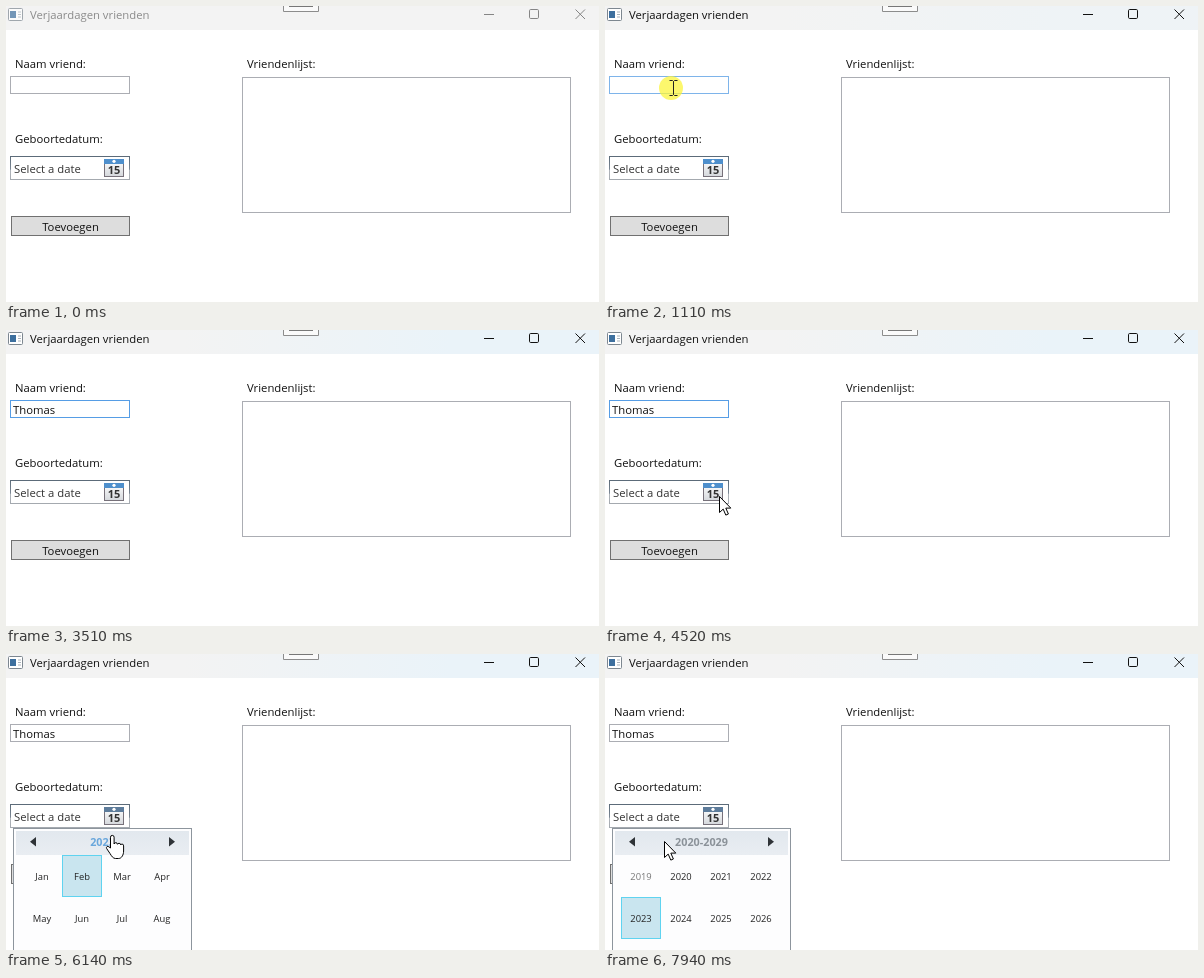
Write an HTML page that moves like this. It is 593 px wide and 296 px high and loops after 8 s.

```html
<!DOCTYPE html>
<html lang="nl">
<head>
<meta charset="utf-8">
<title>Verjaardagen vrienden</title>
<style>
  html, body { margin: 0; width: 100%; height: 100%; overflow: hidden; background: #fff; }
  svg { display: block; width: 593px; height: 296px; }
  text { font: 11.3px "Open Sans", "Noto Sans", sans-serif; fill: #111; white-space: pre; }
  .mid { text-anchor: middle; }
  .small { font-size: 9.4px; fill: #222; }
  .bold { font-size: 10.2px; font-weight: 700; fill: #333; }
  .muted { fill: #777; }
  .box { fill: #fff; stroke: #abadb3; }
  .pick { fill: #c9e5ef; stroke: #5fd3f0; }
  .pointer { fill: #fff; stroke: #000; stroke-linejoin: round; }
</style>
</head>
<body>
<svg viewBox="0 0 593 296">
  <defs>
    <linearGradient id="active"><stop offset=".3" stop-color="#f3f3f3"/><stop offset=".75" stop-color="#eaf3f9"/></linearGradient>
    <linearGradient id="edge" x2="0" y2="1"><stop stop-color="#5c6b79"/><stop offset=".55" stop-color="#7b8794"/><stop offset=".6" stop-color="#b0b5bb"/><stop offset="1" stop-color="#a4a9af"/></linearGradient>
    <linearGradient id="band" x2="0" y2="1"><stop stop-color="#e2e8ee"/><stop offset="1" stop-color="#e9edf2"/></linearGradient>
    <linearGradient id="paper" x2="0" y2="1"><stop stop-color="#fff"/><stop offset="1" stop-color="#d5d8dc"/></linearGradient>
  </defs>

  <rect width="593" height="24" fill="#f3f3f3"/>
  <rect id="activeBar" width="593" height="24" fill="url(#active)"/>
  <g id="windowIcon">
    <rect x="2.5" y="2.5" width="14" height="12" rx="1" fill="#fff" stroke="#7d8790"/>
    <rect x="4" y="5" width="6" height="7" fill="#3d6f9e"/>
    <path d="M12 6h3M12 8.5h3M12 11h3" stroke="#aab2ba"/>
  </g>
  <path d="M277.5 0V5.5H312.5V0" fill="#fafafa" stroke="#8c8c8c"/>
  <path d="M283 .5h24" stroke="#777"/>
  <text id="caption" x="24" y="13">Verjaardagen vrienden</text>
  <g id="controls" fill="none">
    <path d="M478 8.5h10M569.5 3.5l9.5 9.5M579 3.5l-9.5 9.5"/>
    <rect x="523.5" y="3.5" width="9" height="9" rx="1.2"/>
  </g>

  <text x="9" y="62">Naam vriend:</text>
  <text x="241" y="62">Vriendenlijst:</text>
  <text x="9" y="137">Geboortedatum:</text>
  <rect class="box" x="236.5" y="71.5" width="328" height="135"/>
  <rect id="nameBox" class="box" x="4.5" y="70.5" width="119" height="17"/>
  <text id="name" x="7" y="84"></text>
  <path id="caret" d="M.5 72v14" stroke="#000"/>

  <rect x="4.5" y="150.5" width="119" height="23" fill="#fff" stroke="url(#edge)"/>
  <text x="8" y="167" style="fill:#333">Select a date</text>
  <rect x="98.5" y="153.5" width="19" height="17" fill="url(#paper)" stroke="#77717a"/>
  <rect id="iconTop" x="98" y="153" width="20" height="5"/>
  <circle cx="108" cy="155.3" r="1.6" fill="#fff"/>
  <text class="bold mid" x="108" y="168.3" style="font-size:11px">15</text>

  <rect x="5.5" y="210.5" width="118" height="19" fill="#ddd" stroke="#707070"/>
  <text class="mid" x="64.5" y="225">Toevoegen</text>

  <g id="popup">
    <rect x="7.5" y="174.5" width="178" height="130" fill="#fdfdfe" stroke="#8d959d"/>
    <rect x="10" y="177" width="173" height="24" fill="url(#band)"/>
    <path d="M30 183v9.6l-6-4.8zM163 183v9.6l6-4.8z" fill="#2f3337"/>
    <text id="heading" class="bold mid" x="96.5" y="192"></text>
    <g id="days"><rect x="65.5" y="226.5" width="20" height="15" rx="1" fill="#a5a9ac" stroke="#8fbbdc"/></g>
    <g id="months"><rect class="pick" x="56.5" y="201.5" width="39" height="41"/></g>
    <g id="years"><rect class="pick" x="16.5" y="243.5" width="39" height="41"/></g>
  </g>

  <circle id="click" r="12" fill="#fbf43c" opacity=".75"/>
  <g id="cursor">
    <path id="arrow" class="pointer" d="M.5.5V16.5l3.7-3.4 2.6 6 2.6-1.1-2.6-5.9h5z"/>
    <path id="beam" fill="none" stroke="#222" d="M-3.5-7.5h3l1 1 1-1h3M.5-6.5v13M-3.5 7.5h3l1-1 1 1h3"/>
    <path id="hand" class="pointer" d="M-1.5 13V2.2a1.8 1.8 0 0 1 3.6 0V9q.3-1.3 1.7-1.3 1.6 0 1.7 1.6.3-1 1.6-1 1.5 0 1.6 1.6.3-.8 1.4-.8 1.5 0 1.5 1.8V16c0 4-2 7.5-5 7.5H3.5C1 23.5-.5 21-2 18.5L-5.3 13.6c-1-1.6.9-2.9 2.2-1.8z"/>
  </g>
</svg>
<script>
const LOOP = 8000, STEP = 70;
const $ = id => document.getElementById(id);
const show = (id, on) => $(id).style.display = on ? "" : "none";
const within = (t, a, b) => t >= a && t < b;

function addText(parent, x, y, label, cls) {
  const el = document.createElementNS("http://www.w3.org/2000/svg", "text");
  el.setAttribute("x", x);
  el.setAttribute("y", y);
  el.setAttribute("class", "mid " + cls);
  el.textContent = label;
  $(parent).append(el);
  return el;
}

[..."MTWTFSS"].forEach((d, i) => addText("days", 34 + 20.8 * i, 219.5, d, "bold"));
for (let i = 0; i < 35; i++) {
  const date = new Date(2023, 0, 30 + i);
  const other = date.getMonth() !== 1;
  const el = addText("days", 34 + 20.8 * (i % 7), 238 + 15.3 * Math.floor(i / 7),
    date.getDate(), other ? "small muted" : "small");
  if (i === 2) el.style.fill = "#fff";
}
"Jan Feb Mar Apr May Jun Jul Aug".split(" ").forEach((month, i) => {
  const x = 36 + 40 * (i % 4), y = i < 4 ? 226 : 268;
  addText("months", x, y, month, "small");
  addText("years", x, y, 2019 + i, i ? "small" : "small muted");
});

// time, x, y
const path = [
  [200, 421, 238], [970, 68, 82], [3900, 68, 82], [4250, 126, 190], [4520, 114, 166],
  [5600, 114, 166], [5810, 106, 181], [6609, 106, 181], [6610, 106, 186],
  [7800, 106, 186], [7940, 59, 187]
];
const clicks = [[1110, 1310], [4790, 5120], [6010, 6140], [6810, 6940]];
const keyTimes = [1980, 2260, 2390, 2590, 2720, 2850];
const carets = [[1170, 1710], [1980, 3510], [4040, 4510]];
const inSpan = (spans, t) => spans.some(([a, b]) => within(t, a, b));

function pointerAt(t) {
  let i = path.findIndex(p => p[0] > t);
  if (i < 0) return path[path.length - 1].slice(1);
  if (i === 0) i = 1;
  const [a, x0, y0] = path[i - 1], [b, x1, y1] = path[i];
  const u = Math.max(0, Math.floor((t - a) / STEP) * STEP / (b - a));
  const k = u * u * (3 - 2 * u);
  return [Math.round(x0 + (x1 - x0) * k), Math.round(y0 + (y1 - y0) * k)];
}

function draw(t) {
  const active = t >= 1110;
  show("activeBar", active);
  $("activeBar").style.opacity = t < 1310 ? .5 : 1;
  $("windowIcon").style.opacity = active ? 1 : .7;
  $("caption").style.fill = active ? "#111" : "#8b8b8b";
  $("controls").style.stroke = active ? "#111" : "#858585";

  $("nameBox").style.stroke = within(t, 1170, 4790) ? "#569de5" : within(t, 900, 1170) ? "#7eb4ea" : "#abadb3";
  $("name").textContent = "Thomas".slice(0, keyTimes.filter(k => t >= k).length);
  show("caret", inSpan(carets, t));
  $("caret").setAttribute("transform", `translate(${Math.round(7 + $("name").getComputedTextLength())})`);

  $("iconTop").style.fill = t < 4790 ? "#4e8fcc" : "#5d7c9b";
  const view = t < 6070 ? "days" : t < 6880 ? "months" : "years";
  show("popup", t >= 4860);
  for (const v of ["days", "months", "years"]) show(v, v === view);
  const heading = $("heading");
  heading.textContent = { days: "February 2023", months: "2023", years: "2020-2029" }[view];
  heading.style.fontSize = view === "days" ? "10.2px" : "10.8px";
  heading.style.fill = view === "years" ? "#8b9299" : t >= 5740 ? "#6aa7dc" : "#333";

  const [x, y] = pointerAt(t);
  const overName = within(x, 4, 124) && within(y, 70, 88);
  const overHeading = within(t, 5740, 6880);
  show("cursor", within(t, 200, 2060) || t >= 3970);
  $("cursor").setAttribute("transform", `translate(${x} ${y})`);
  show("beam", overName);
  show("hand", overHeading);
  show("arrow", !overName && !overHeading);
  show("click", inSpan(clicks, t));
  $("click").setAttribute("transform", `translate(${overName ? x - 2 : x} ${y})`);
}

function frame() {
  draw(performance.now() % LOOP);
  requestAnimationFrame(frame);
}
frame();
</script>
</body>
</html>
```
